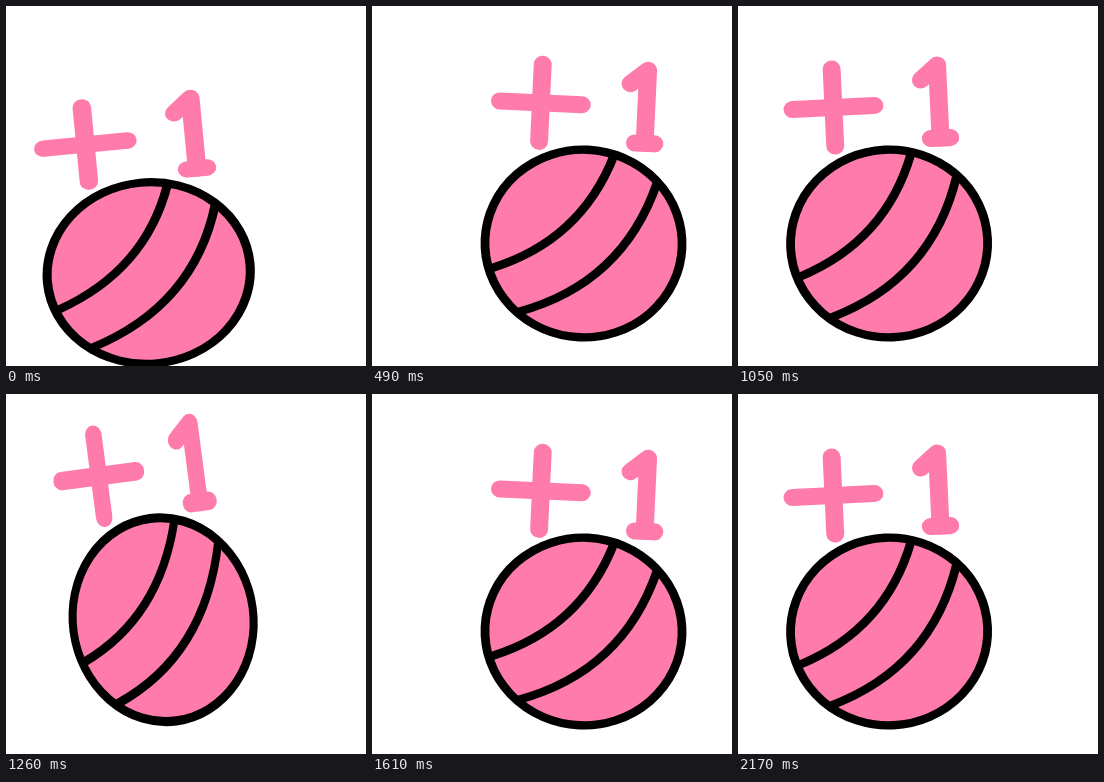
Write an HTML page with a canvas that moves like this. It is 360 by 360 pixels and loops after 2.24 s.

```html
<!DOCTYPE html>
<html lang="en">
<head>
<meta charset="utf-8">
<title>Bouncing ball</title>
<style>
html, body { margin: 0; width: 100%; height: 100%; overflow: hidden; background: #fff; }
canvas { display: block; }
</style>
</head>
<body>
<canvas id="stage" width="360" height="360"></canvas>
<script>
const ctx = document.getElementById('stage').getContext('2d');
const PINK = '#ff7bac';
const STEP = 70;
const CYCLE = 16;

// a·cos + b·sin of an angle
const wave = (angle, a, b) => a * Math.cos(angle) + b * Math.sin(angle);

// Sway and tilt swing once per cycle; height and stretch repeat on each hop.
function poseAt(ms) {
  const t = Math.floor(ms / STEP) % CYCLE * 2 * Math.PI / CYCLE;
  return {
    x: 181.3 + wave(t, -34.1, -2.3) + wave(3 * t, -4.5, -2.3),
    y: 223.9 + wave(2 * t, 35.9, 9) + wave(4 * t, 7.2, 5.4),
    tilt: wave(t, -5.5, -4.3) + wave(3 * t, 0, -0.8),
    stretch: 0.978 + wave(2 * t, 0.053, -0.013) + wave(4 * t, 0.026, 0)
  };
}

function line(...pts) {
  ctx.beginPath();
  pts.forEach(([x, y]) => ctx.lineTo(x, y));
  ctx.stroke();
}

function stripe(x0, y0, cx, cy, x1, y1) {
  ctx.beginPath();
  ctx.moveTo(x0, y0);
  ctx.quadraticCurveTo(cx, cy, x1, y1);
  ctx.stroke();
}

function drawBall() {
  ctx.fillStyle = PINK;
  ctx.strokeStyle = '#000';
  ctx.lineWidth = 8.6;
  ctx.beginPath();
  ctx.arc(0, 0, 96.2, 0, Math.PI * 2);
  ctx.fill();
  ctx.stroke();
  stripe(25.5, -91, -3, -3, -88, 29.5);
  stripe(69, -66, 40, 39, -60, 73);
}

function drawScore() {
  ctx.strokeStyle = PINK;
  ctx.lineWidth = 17.5;
  ctx.lineCap = ctx.lineJoin = 'round';
  line([-88, -142], [-8, -142]);
  line([-48, -181.5], [-48, -102.5]);
  line([38.5, -166], [55, -180.5], [55, -105.5]);
  line([45.5, -105.5], [64.5, -105.5]);
}

function draw(ms) {
  const { x, y, tilt, stretch } = poseAt(ms);
  ctx.fillStyle = '#fff';
  ctx.fillRect(0, 0, 360, 360);
  ctx.save();
  ctx.translate(x, y);
  ctx.rotate(tilt * Math.PI / 180);
  ctx.scale(stretch, 2 - stretch);
  drawBall();
  drawScore();
  ctx.restore();
}

const start = performance.now();
function tick() {
  draw(performance.now() - start);
  requestAnimationFrame(tick);
}
tick();
</script>
</body>
</html>
```
